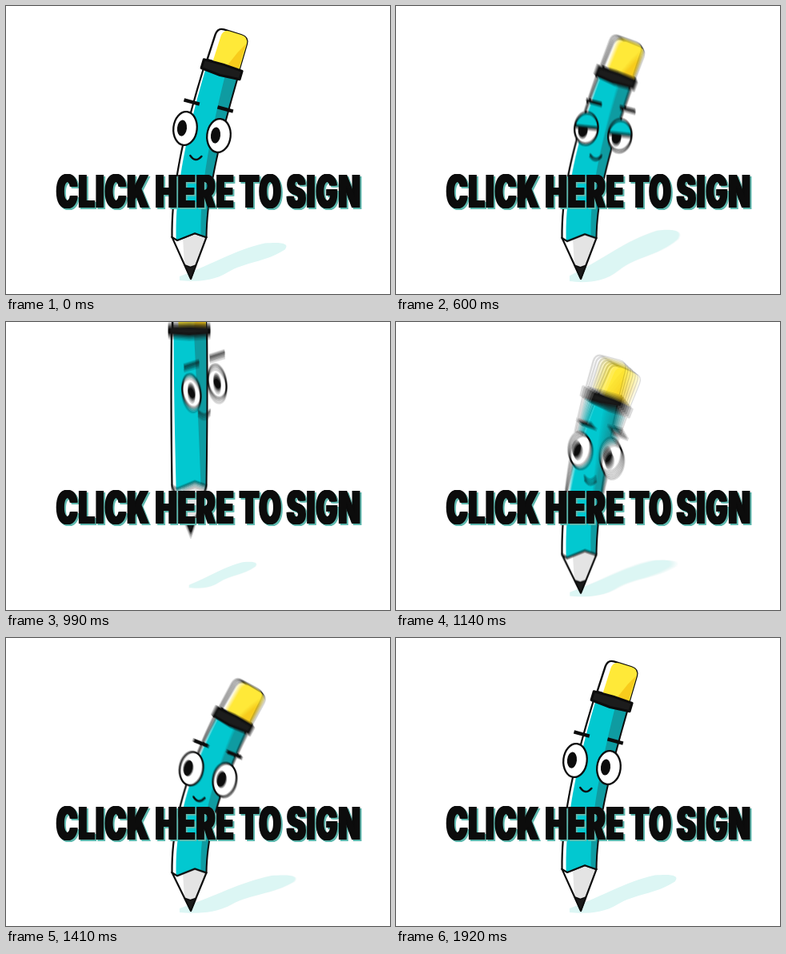
Recreate the animation shown at these times as an HTML page with a canvas. Size 480x360 px, loop 1950 ms.

```html
<!DOCTYPE html>
<html lang="en">
<head>
<meta charset="utf-8">
<title>Click here to sign</title>
<style>
html, body { margin: 0; width: 100%; height: 100%; overflow: hidden; background: #fff; }
canvas { display: block; width: 480px; height: 360px; }
</style>
</head>
<body>
<canvas id="stage" width="480" height="360"></canvas>
<script>
const W = 480, H = 360, LOOP = 1950, STEP = 30;
const stage = document.getElementById('stage').getContext('2d');
const layer = document.createElement('canvas');
layer.width = W;
layer.height = H;
const g = layer.getContext('2d');
const INK = '#0c0c0c', TEAL = '#02c8d0', SHADE = '#0f9ba1';

// time, tip y, body base y, bend x, top x, top y, face x, face y, eye gap x, eye gap y, eyelid, shadow end y
const REST = [0, 341, 289, 250, 284, 33, 245, 157.5, 21, 4.5, 0, 302];
const at = (time, pose) => [time, ...pose.slice(1)];
const POSES = [
  REST,
  at(120, REST),
  [360, 341, 295, 241, 302, 75, 241, 181.5, 16, 6.5, .46, 314],
  [450, 341, 297, 245, 309, 83, 245, 187, 16, 6, .5, 315],
  [600, 341, 290, 252, 292, 44, 259, 157.5, 21, 4.5, .47, 288],
  [720, 341, 286, 236, 250, 12, 244, 135, 20, 1, .2, 296],
  [840, 240, 184, 230, 231, -68, 246, 58, 17, -5, 0, 304],
  [990, 264, 206, 229, 229, -38, 248, 82, 16, -6, 0, 304],
  [1080, 335, 280, 234, 242, 16, 244, 142, 19, 0, 0, 303],
  [1230, 341, 298, 254, 332, 88, 261, 185, 20, 10, 0, 304],
  [1290, 341, 297, 253, 327, 83, 259.5, 181.5, 20.5, 9.5, 0, 303],
  [1590, 341, 289, 249, 283, 33, 244, 158, 21, 4, 0, 302],
  at(LOOP, REST)
];

function slope(i, k) {
  if (i < 1 || i > POSES.length - 2) return 0;
  const [a, b, c] = [POSES[i - 1], POSES[i], POSES[i + 1]];
  const p = (b[k] - a[k]) / (b[0] - a[0]), q = (c[k] - b[k]) / (c[0] - b[0]);
  return p * q > 0 ? 2 * p * q / (p + q) : 0;
}

// Smooth, non-overshooting interpolation between poses
function poseAt(t) {
  t = (t + LOOP) % LOOP;
  let i = 0;
  while (POSES[i + 1][0] <= t) i++;
  const a = POSES[i], b = POSES[i + 1], d = b[0] - a[0], u = (t - a[0]) / d;
  const u2 = u * u, u3 = u2 * u, h = 3 * u2 - 2 * u3;
  return a.map((v, k) => v * (1 - h) + b[k] * h +
    d * ((u3 - 2 * u2 + u) * slope(i, k) + (u3 - u2) * slope(i + 1, k)));
}

// Curved centre line, addressed by arc length and sideways offset
function makeSpine(baseY, bendX, topX, topY) {
  const n = 60, len = baseY - topY, pts = [];
  const bez = (a, b, c, d, u) => {
    const v = 1 - u;
    return a * v * v * v + 3 * b * v * v * u + 3 * c * v * u * u + d * u * u * u;
  };
  let s = 0;
  for (let i = 0; i <= n; i++) {
    const x = bez(229, 229, bendX, topX, i / n);
    const y = bez(baseY, baseY - .27 * len, topY + .42 * len, topY, i / n);
    if (i) s += Math.hypot(x - pts[i - 1].x, y - pts[i - 1].y);
    pts.push({ x, y, s });
  }
  const segment = dist => {
    let i = 0;
    while (i < n - 1 && pts[i + 1].s < dist) i++;
    const a = pts[i], b = pts[i + 1], l = b.s - a.s;
    return { a, dx: (b.x - a.x) / l, dy: (b.y - a.y) / l };
  };
  return {
    len: s,
    dir(y) {
      const p = pts.find(q => q.y <= y) || pts[n];
      const { dx, dy } = segment(p.s);
      return [dx, dy];
    },
    point(dist, off) {
      const { a, dx, dy } = segment(dist), r = dist - a.s;
      return [a.x + dx * r - dy * off, a.y + dy * r + dx * off];
    }
  };
}

function trace(pts, closed = true) {
  g.beginPath();
  pts.forEach(p => g.lineTo(p[0], p[1]));
  if (closed) g.closePath();
}
function paint(fill, line, width) {
  if (fill) { g.fillStyle = fill; g.fill(); }
  if (line) { g.strokeStyle = line; g.lineWidth = width; g.stroke(); }
}
function shape(pts, fill, line, width) {
  trace(pts);
  paint(fill, line, width);
}

function drawShadow(tipY, topX, endY) {
  const k = (341 - tipY) / 77;
  const x = 217 + 12 * k, y = 340 - 10 * k;
  const dx = 350 + (topX - 284) * .5 - 10 * k - x, dy = endY - y, thick = -dy / 38;
  const p = (u, v) => [x + dx * u, y + dy * u + v * thick];
  const curve = (...q) => g.bezierCurveTo(...q.flat());
  g.beginPath();
  g.moveTo(...p(0, -2));
  curve(p(.35, -6), p(.5, -15), p(.8, -13));
  curve(p(.95, -9), p(1.04, -4), p(.99, 2));
  curve(p(.8, 11), p(.62, 3), p(.45, 10));
  curve(p(.3, 17), p(.1, 8), p(0, 3));
  paint('#dcf6f4');
}

function drawPencil(sp, tipY) {
  const P = sp.point, bodyEnd = sp.len - 55, bandEnd = sp.len - 42;
  const half = s => 21.5 + Math.sin(Math.PI * Math.max(0, s / sp.len));
  const edge = (s0, s1, v) => Array.from({ length: 25 }, (_, i) => {
    const s = s0 + (s1 - s0) * i / 24;
    return P(s, half(s) * (typeof v === 'number' ? v : v(i / 24)));
  });
  const tip = [231, tipY];
  const mix = (p, k) => [p[0] + (tip[0] - p[0]) * k, p[1] + (tip[1] - p[1]) * k];
  const left = P(0, -21.5), right = P(0, 21.5);
  const notch = [right, P(5, 7), P(-4, -15)];
  const rim = [left, ...notch.slice().reverse()];

  // cone and lead
  shape([...rim, tip], '#e4e4e4');
  shape([left, P(-4, -15), P(0, -8), mix(left, .66)], '#fff');
  shape([...rim, tip], null, INK, 2.2);
  const l = mix(left, .67), r = mix(right, .67);
  shape([l, mix(P(0, 0), .72), r, tip], '#1b1b1b', INK, 1.5);

  // barrel
  const leftEdge = edge(0, bodyEnd, -1), rightEdge = edge(bodyEnd, 0, 1);
  shape([...leftEdge, ...rightEdge, ...notch], '#fff');
  shape([...edge(-4, bodyEnd, u => -.76 - .12 * u), ...rightEdge, P(5, 7)], TEAL);
  shape([...edge(1, bodyEnd, u => .68 - .4 * u), ...rightEdge], SHADE);
  trace(leftEdge, false);
  paint(null, INK, 2.2);
  trace(rightEdge, false);
  paint(null, INK, 2);
  trace(rim, false);
  paint(null, INK, 2);

  // eraser
  const L = sp.len, cap = v => {
    g.beginPath();
    g.moveTo(...P(bandEnd, 21 * v));
    g.lineTo(...P(L - 9, 20.5 * v));
    g.quadraticCurveTo(...P(L, 20 * v), ...P(L, 20 * v + 8));
    g.lineTo(...P(L, 11));
    g.quadraticCurveTo(...P(L, 20), ...P(L - 9, 20.5));
    g.lineTo(...P(bandEnd, 21));
    g.closePath();
  };
  cap(-1);
  paint('#fff', INK, 2.4);
  cap(-.65);
  paint('#ffe938');
  shape([P(bandEnd, 5), P(bandEnd + 20, 13), P(L - 9, 19.5), P(bandEnd, 20)], '#f8cc1c');

  // band
  shape([P(bodyEnd + 1, -25), P(bandEnd - 1, -25), P(bandEnd, 0), P(bandEnd - 1, 25),
    P(bodyEnd + 1, 25), P(bodyEnd - 1, 0)], '#1c1c1c', INK, 3);
}

function drawEye(x, y, rx, ry, tilt, look, lid) {
  g.save();
  g.translate(x, y);
  g.rotate(tilt);
  const oval = (cx, cy, a, b) => {
    g.beginPath();
    g.ellipse(cx, cy, a, b, 0, 0, Math.PI * 2);
  };
  oval(0, 0, rx, ry);
  paint('#fff');
  g.save();
  g.clip();
  oval(look, lid * 6, rx * .41, ry * .48);
  paint(INK);
  if (lid > .02) {
    const y0 = ry * (2 * lid - 1);
    g.fillStyle = TEAL;
    g.fillRect(-rx, -ry, rx * 2, ry + y0);
    trace([[-rx, y0], [rx, y0]], false);
    paint(null, INK, 3.5);
  }
  g.restore();
  oval(0, 0, rx, ry);
  paint(null, INK, 2.3);
  g.restore();
}

function drawFace(sp, x, y, sx, sy, lid) {
  const [ux, uy] = sp.dir(y), tilt = Math.atan2(sy, sx);
  const look = Math.max(-4, Math.min(0, -sy * .9));
  const rx = sx * .7, ry = 21 - lid * 3;
  for (const side of [-1, 1]) {
    const ex = x + side * sx, ey = y + side * sy;
    drawEye(ex, ey, rx, ry, tilt * .5, look, lid);
    const bx = ex + ux * 34, by = ey + uy * 34;
    const c = Math.cos(tilt + .05) * 10, s = Math.sin(tilt + .05) * 10;
    trace([[bx - c, by - s], [bx + c, by + s]], false);
    g.lineCap = 'butt';
    paint(null, INK, 4.5);
    g.lineCap = 'round';
  }
  g.save();
  g.translate(x - ux * 32, y - uy * 32);
  g.rotate(tilt * .3);
  g.beginPath();
  g.moveTo(-7, -1);
  g.quadraticCurveTo(0, 8, 7, -1);
  paint(null, INK, 2.6);
  g.restore();
}

function drawScene(t) {
  const [, tipY, baseY, bendX, topX, topY, fx, fy, sx, sy, lid, endY] = poseAt(t);
  g.fillStyle = '#fff';
  g.fillRect(0, 0, W, H);
  g.lineJoin = g.lineCap = 'round';
  drawShadow(tipY, topX, endY);
  const sp = makeSpine(baseY, bendX, topX, topY);
  drawPencil(sp, tipY);
  drawFace(sp, fx, fy, sx, sy, lid);
}

// Heavy condensed lettering
function drawWords(dx, dy, color) {
  stage.fillStyle = color;
  stage.font = '900 56px Inter, "Open Sans", sans-serif';
  stage.letterSpacing = '2.2px';
  const words = [['CLICK', 63], ['HERE', 187], ['TO', 292], ['SIGN', 351]];
  for (const [word, x] of words) {
    for (let w = -1.4; w <= 1.41; w += .7) {
      stage.setTransform(.63, 0, 0, 1, x + dx + w, 252 + dy);
      stage.fillText(word, 0, 0);
    }
  }
  stage.setTransform(1, 0, 0, 1, 0, 0);
}

function frame(now) {
  const t = Math.floor(now % LOOP / STEP) * STEP;
  // average several moments for motion blur
  for (let i = 0; i < 7; i++) {
    drawScene(t + (i - 3) * 4);
    stage.globalAlpha = 1 / (i + 1);
    stage.drawImage(layer, 0, 0);
  }
  stage.globalAlpha = 1;
  drawWords(2, 2, '#5db8ae');
  drawWords(0, 0, INK);
}

let start = null;
function tick(now) {
  if (start === null) start = now;
  frame(now - start);
  requestAnimationFrame(tick);
}
frame(0);
requestAnimationFrame(tick);
</script>
</body>
</html>
```
